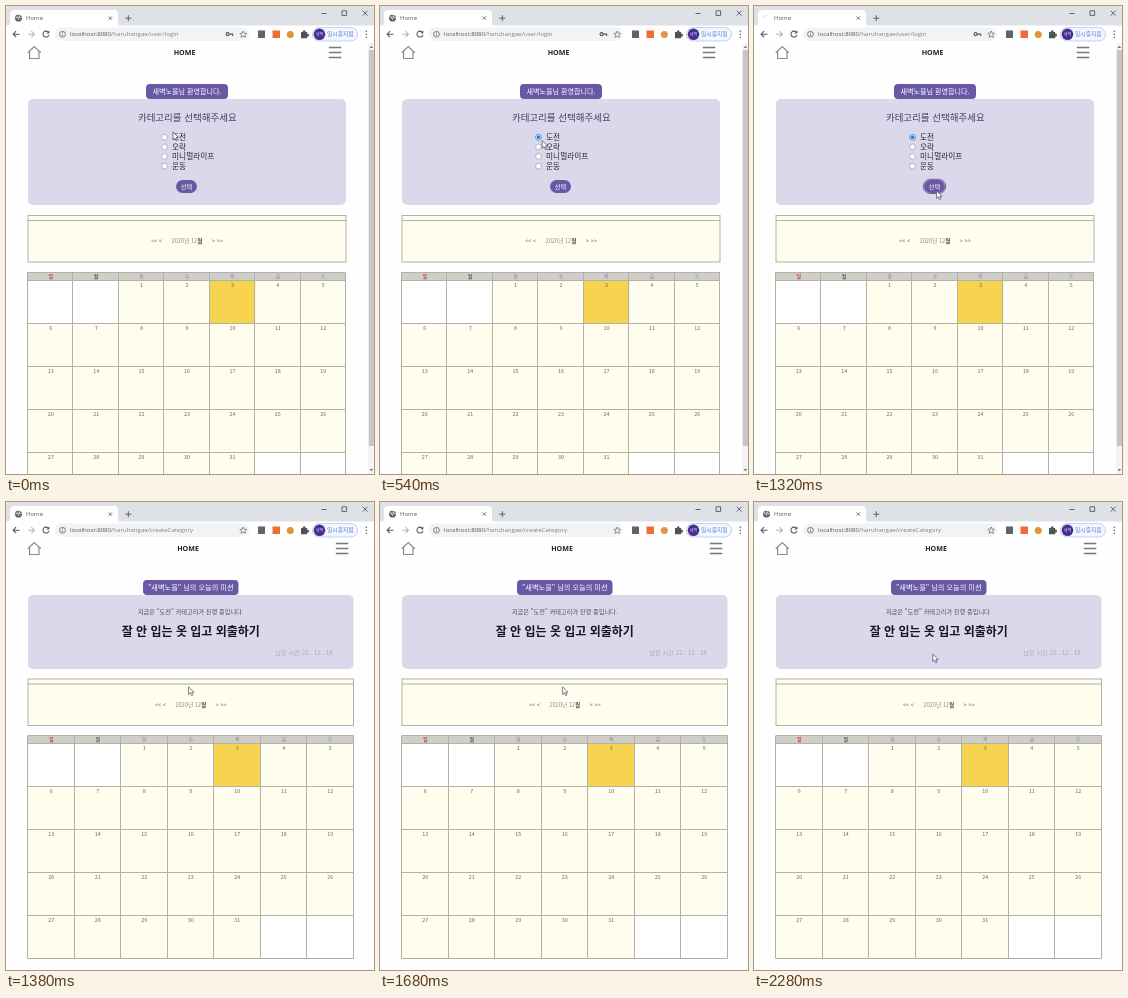
These frames come from a looping animation (368 by 468 pixels, 2340 ms). An HTML page:

```html
<!DOCTYPE html>
<html lang="ko">
<head>
<meta charset="utf-8">
<title>Home</title>
<style>
html, body { margin: 0; width: 100%; height: 100%; overflow: hidden; background: #fefefe; }
svg { display: block; width: 368px; height: 468px; }
text { font-family: "Noto Sans CJK KR", "Noto Sans CJK", "Noto Sans", sans-serif; white-space: pre; }
.ui { font-family: "Open Sans", "Noto Sans", sans-serif; }
</style>
</head>
<body>
<svg id="stage" viewBox="0 0 368 468" xmlns="http://www.w3.org/2000/svg"></svg>
<script>
const LOOP = 2340, STEP = 60, CLICK = 420, SUBMIT = 1320, SWAP = 1380;
const PURPLE = '#6958a5', PALE = '#dcd8eb', CREAM = '#fffdee', LINE = '#b3b0a6', GRAY = '#5f6368';

const rect = (x, y, w, h, fill, extra = '') =>
  `<rect x="${x}" y="${y}" width="${w}" height="${h}" fill="${fill}" ${extra}/>`;
const circle = (x, y, r, fill, extra = '') =>
  `<circle cx="${x}" cy="${y}" r="${r}" fill="${fill}" ${extra}/>`;
const path = (d, color, width = 1, extra = '') =>
  `<path d="${d}" fill="none" stroke="${color}" stroke-width="${width}" ${extra}/>`;
// y is the optical middle of the text
const text = (s, x, y, size, fill, extra = '') =>
  `<text x="${x}" y="${(y + size * 0.36).toFixed(2)}" font-size="${size}" fill="${fill}" ${extra}>${s.replace(/</g, '&lt;')}</text>`;
const mid = (s, x, y, size, fill, extra = '') =>
  text(s, x, y, size, fill, `text-anchor="middle" ${extra}`);

function browser() {
  return rect(0, 0, 368, 20, '#dee1e6')
    + rect(0, 19.5, 368, 17.5, '#fff')
    + '<path d="M1 20Q4 20 4 16V8Q4 4 8 4H108Q112 4 112 8V16Q112 20 115 20Z" fill="#fff"/>'
    + `<g id="globe">${circle(12.5, 12.2, 3.4, GRAY)}${path('M10 10.8l2 .8 .6 2M13.4 9.4l-.4 1.6 2 .8', '#fff', 0.9)}</g>`
    + `<g id="spin">${path('M9.6 12.2a2.9 2.9 0 0 1 2.9-2.9', '#c9ccd1', 0.8)}</g>`
    + text('Home', 20, 12.2, 6, '#55585d', 'class="ui"')
    + path('M102.6 10.4l3.4 3.4m0-3.4l-3.4 3.4', GRAY, 0.9)
    + path('M119.3 12.2h6M122.3 9.2v6', GRAY, 1)
    + path('M315.5 7.5h5M336 4.8h4.6v4.6h-4.6zM356.8 4.8l4.8 4.8m0-4.8l-4.8 4.8', '#444', 0.8)
    + path('M13.5 28.2H7.2m2.9-3l-3 3 3 3', '#55585d', 1.1)
    + path('M22 28.2h6.3m-2.9-3l3 3-3 3', '#b4b7bb', 1.1)
    + path('M42.3 26.2a3 3 0 1 0 .6 2.6', '#55585d', 1.1)
    + '<path d="M43.4 24.6v3h-3z" fill="#55585d"/>'
    + rect(49, 21.5, 194, 13.5, '#f1f3f4', 'rx="6.7"')
    + circle(56.5, 28.2, 2.9, 'none', `stroke="${GRAY}" stroke-width=".8"`)
    + path('M56.5 27.8v2M56.5 26.2v.8', GRAY, 0.8)
    + '<text class="ui" x="64" y="30.4" font-size="6.1" fill="#7b7f84"><tspan fill="#54575c">localhost:8080</tspan><tspan id="route"></tspan></text>'
    + '<g id="key">' + circle(221.6, 28.2, 1.5, 'none', 'stroke="#55585d" stroke-width="1.2"')
    + path('M223 28.2h3.6v1.8', '#55585d', 1.2) + '</g>'
    + path('M237.2 25l1 2.2 2.4.2-1.8 1.6.5 2.4-2.1-1.3-2.1 1.3.5-2.4-1.8-1.6 2.4-.2z', GRAY, 0.7)
    + rect(252, 24.5, 7, 7.5, '#606367')
    + rect(266.5, 24.5, 7.5, 7.5, '#ef6c35')
    + circle(284.3, 28.4, 3.5, '#e3953c')
    + '<path d="M295 26h2a1.3 1.3 0 1 1 2.4 0h1.8v2a1.3 1.3 0 1 1 0 2.4v1.8H295z" fill="#505358"/>'
    + rect(306.5, 21.6, 45, 13.4, '#f3f7ff', 'rx="6.7" stroke="#b4c4e6" stroke-width=".8"')
    + circle(313.5, 28.3, 5.8, '#4b2d92')
    + mid('새벽', 313.5, 28.3, 4, '#d8cdf0')
    + text('일시중지됨', 321, 28.3, 5.8, '#5b85d6')
    + [25.2, 28.2, 31.2].map(y => circle(360.3, y, 0.8, '#55585d')).join('');
}

function header(cx, menuX) {
  return path('M21.8 46.8L28.3 40.6 34.8 46.8M23.6 45.5V52.5H33V45.5', '#8c8c90', 1.2)
    + mid('HOME', cx, 46.6, 7.1, '#222', 'class="ui" font-weight="700"')
    + path(`M${menuX} 41.5h12.5m-12.5 5h12.5m-12.5 5h12.5`, '#77777b', 1.6);
}

function calendar(width, top) {
  const right = 22 + width, cw = width / 7, cx = 22 + width / 2, grid = top + 65;
  const at = i => 22 + i * cw;
  let s = rect(22, top + 0.5, width, 46.5, CREAM, `stroke="${LINE}"`)
    + path(`M22 ${top + 5.5}H${right}`, LINE)
    + mid('<< <', cx - 30.3, top + 26, 5.7, '#66646a', 'font-weight="500"')
    + mid('> >>', cx + 30.3, top + 26, 5.7, '#66646a', 'font-weight="500"')
    + `<text x="${cx}" y="${top + 28}" font-size="5.7" text-anchor="middle" fill="#8b8990">2020년 12<tspan font-weight="700" fill="#444">월</tspan></text>`
    + rect(22, grid - 8, width, 8, '#d0cec9')
    + rect(22, grid, width, 215, CREAM)
    + rect(22, grid, cw * 2, 43, '#fff')
    + rect(at(5), grid + 172, cw * 2, 43, '#fff')
    + rect(at(4), grid, cw, 43, '#f6d450');
  [...'일월화수목금토'].forEach((d, i) => {
    const color = i === 0 ? '#d62f32' : i === 6 ? '#6bb0aa' : i === 1 ? '#55545a' : '#85848a';
    s += mid(d, at(i + 0.5), grid - 4, 5, color, i < 2 ? 'font-weight="700"' : '');
  });
  for (let day = 1; day <= 31; day++) {
    const n = day + 1;
    s += mid(String(day), at(n % 7 + 0.5), grid + Math.floor(n / 7) * 43 + 4.8, 5.4, '#6b6963');
  }
  // grid lines sit on whole pixels
  const snap = v => Math.floor(v) + 0.5;
  let d = `M22 ${snap(grid - 8)}H${right}`;
  for (let r = 0; r < 6; r++) d += `M22 ${snap(grid + r * 43)}H${right}`;
  for (let c = 0; c < 8; c++) d += `M${snap(at(c) - 0.5)} ${grid - 8}V${grid + 215}`;
  return s + path(d, LINE);
}

function loginPage() {
  const labels = ['도전', '오락', '미니멀라이프', '운동'];
  return header(178.5, 322.8)
    + rect(22, 93, 318, 106, PALE, 'rx="5"')
    + rect(140, 78, 82, 15, PURPLE, 'rx="4"')
    + mid('새벽노을님 환영합니다.', 181, 85.6, 7.1, '#fff')
    + mid('카테고리를 선택해주세요', 181.3, 111.3, 9.5, '#45405a', 'font-weight="500"')
    + labels.map((s, i) => {
      const y = 131.3 + i * 9.6;
      return circle(158.5, y, 2.9, '#fff', `stroke="#a3a2ad" stroke-width=".8" ${i ? '' : 'id="ring"'}`)
        + text(s, 166, y, 7.7, '#292732');
    }).join('')
    + `<g id="dot">${circle(158.5, 131.3, 1.7, '#2374d5')}</g>`
    + rect(169.3, 173.3, 22.4, 14.2, 'none', 'id="focus" rx="7" stroke="#4d4678" stroke-width=".8"')
    + rect(170, 174, 21, 13, PURPLE, 'rx="6.5"')
    + mid('선택', 180.5, 180.5, 6.2, '#fff')
    + calendar(318, 209)
    + rect(362, 37, 6, 431, '#f4f4f4')
    + rect(362.8, 44, 5.2, 396, '#c6c6c6')
    + '<path d="M363.6 42l1.8-2.2 1.8 2.2zM363.6 463l1.8 2.2 1.8-2.2z" fill="#777"/>';
}

function missionPage() {
  return header(182, 329.8)
    + rect(22, 93, 325.5, 74, PALE, 'rx="5"')
    + rect(137, 78, 95.5, 15, PURPLE, 'rx="4"')
    + mid('"새벽노을" 님의 오늘의 미션', 184.7, 85.6, 7.2, '#fff')
    + mid('지금은 "도전" 카테고리가 진행 중입니다.', 184.7, 110, 6.2, '#4a4658')
    + mid('잘 안 입는 옷 입고 외출하기', 184.8, 130, 12, '#17151f', 'font-weight="700"')
    + text('남은 시간 22 : 12 : 18', 269.5, 150.8, 6.2, '#aaa6b9')
    + calendar(325.5, 176.5);
}

const stage = document.getElementById('stage');
stage.innerHTML = rect(0, 0, 368, 468, '#fefefe')
  + `<g id="login">${loginPage()}</g><g id="mission">${missionPage()}</g>` + browser()
  + '<path id="cursor" d="M0 0V7.6L1.8 6 3 8.7 4.3 8.1 3.1 5.5H5.4Z" fill="#fff" stroke="#4a4852" stroke-width=".7"/>';

const el = id => document.getElementById(id);
const show = (id, on) => el(id).setAttribute('display', on ? 'inline' : 'none');

// time, x, y of the pointer tip
const track = [
  [0, 167, 126], [240, 160.5, 128.5], [480, 160.5, 128.5], [780, 176.6, 187],
  [840, 176.6, 187], [1080, 182.6, 184.8], [1860, 182.6, 184.8], [2220, 178.8, 152], [2340, 178.8, 152]
];
function pointer(t) {
  const i = Math.max(1, track.findIndex(k => k[0] >= t));
  const [t0, x0, y0] = track[i - 1], [t1, x1, y1] = track[i];
  const p = (t - t0) / (t1 - t0), e = p * p * (3 - 2 * p);
  return [x0 + (x1 - x0) * e, y0 + (y1 - y0) * e];
}

function draw(now) {
  const t = Math.floor(now % LOOP / STEP) * STEP;
  const done = t >= SWAP, loading = t >= SUBMIT && !done, picked = t >= CLICK;
  show('login', !done);
  show('key', !done);
  show('mission', done);
  show('globe', !loading);
  show('spin', loading);
  show('dot', picked);
  show('focus', loading);
  el('ring').setAttribute('stroke', picked ? '#2374d5' : '#a3a2ad');
  el('route').textContent = '/haruhangae/' + (done ? 'createCategory' : 'user/login');
  el('cursor').setAttribute('transform', `translate(${pointer(t).map(v => v.toFixed(2))})`);
}

const start = performance.now();
function tick() {
  draw(performance.now() - start);
  requestAnimationFrame(tick);
}
tick();
</script>
</body>
</html>
```
